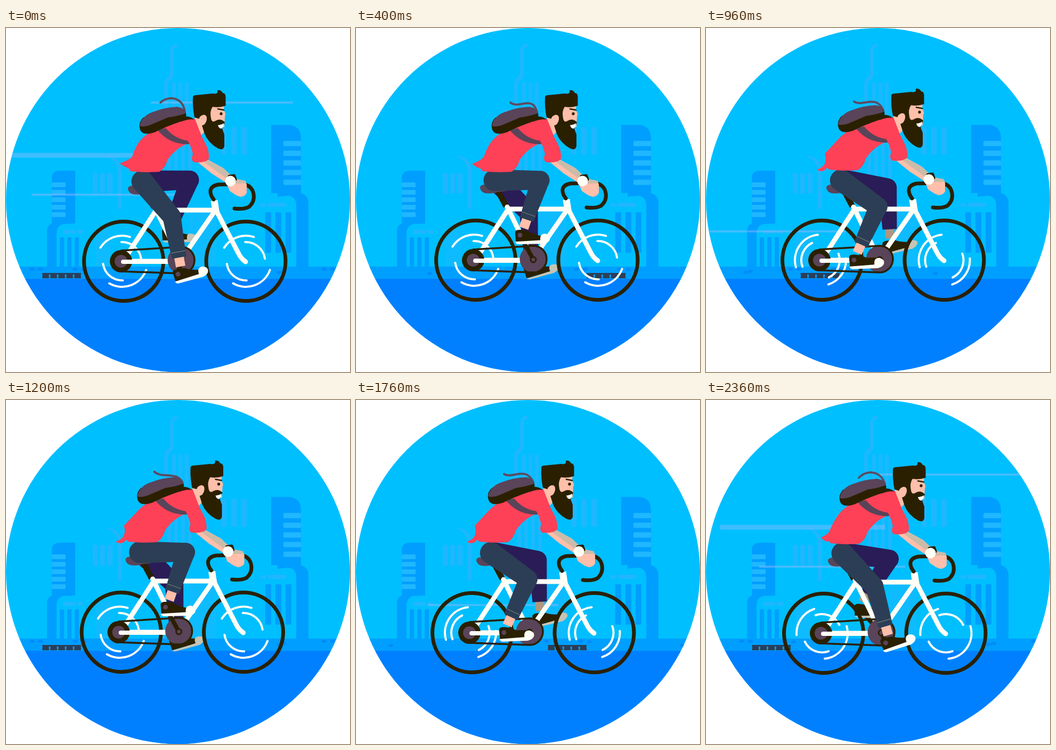
An HTML page that plays this animation: 646x646 px, repeating every 2400 ms.

```html
<!DOCTYPE html>
<html lang="en">
<head>
<meta charset="utf-8">
<title>Cyclist</title>
<style>
html, body { margin: 0; width: 100%; height: 100%; overflow: hidden; background: #fff; }
svg { display: block; width: 100vw; height: 100vh; }
.ink { fill: #2a2000; }
.inkLine { fill: none; stroke: #2a2000; stroke-linecap: round; stroke-linejoin: round; }
.plum { fill: #594459; }
.dark { fill: #009fff; }
.pale { fill: #1fb7ff; }
.skin { fill: #ffbfaa; }
.red { fill: #ff4157; }
.white { fill: none; stroke: #fffef6; stroke-linecap: round; stroke-linejoin: round; }
</style>
</head>
<body>
<svg viewBox="0 0 646 646">
  <defs><clipPath id="disc"><circle cx="323" cy="323" r="323"/></clipPath></defs>
  <g clip-path="url(#disc)">
    <rect width="646" height="646" fill="#00bfff"/>

    <g class="pale">
      <path d="M322 30Q308 30 308 46V84Q307 91 301 94Q297 98 297 108V165H304V108Q304 101 309 98Q315 95 315 84V42Q316 36 322 35Z"/>
      <path d="M187 240Q217 240 217 272V340H210V272Q209 247 187 240Z"/>
      <path d="M272 152Q300 152 300 180H292Q290 160 272 152Z"/>
      <path d="M107 379H130V386H107ZM135 379H145V386H135ZM478 329H488V336H478ZM492 328H526V336H492Z"/>
      <g id="stripes"></g>
      <path d="M168 378H196V448H168ZM345 345H395V448H345Z" opacity=".5"/>
    </g>

    <g class="dark">
      <path d="M86 280Q87 268 101 268H130V367H86Z"/>
      <path d="M77 448V382Q77 366 94 366H130V362H130V367Q120 368 108 368Q95 371 95 386V448Z"/>
      <path d="M498 182H532Q554 184 554 208V310H498Z"/>
      <path d="M510 310H553Q568 313 568 330V448H545V332Q544 315 528 315L510 317Z"/>
      <g id="bars"></g>
    </g>
    <g class="pale" id="panes"></g>

    <rect y="448" width="646" height="24" fill="#009fff"/>
    <rect y="471" width="646" height="175" fill="#0080ff"/>
    <g id="ground"></g>
    <g id="wind" fill="#9fb8ff"></g>

    <g id="rider">
      <g id="farLeg">
        <path id="farCrank" class="inkLine" stroke-width="8"/>
        <path id="farSkin" stroke="#ad9780" stroke-width="17"/>
        <g id="farShoe">
          <path class="ink" d="M-9-5Q-9-11 2-10L15-8Q25-1 40 2L53 5V12H-8Z"/>
          <path fill="#c6c4b4" d="M-9 13L38 11Q36-1 46 0Q57 2 56 8Q53 14 44 16H-3Z"/>
        </g>
        <g fill="#2a1c57"><path id="farThigh"/><path id="farShin"/></g>
      </g>

      <g class="inkLine" stroke-width="7">
        <circle cx="221" cy="438" r="74.5"/>
        <circle cx="450.5" cy="438" r="74.5"/>
      </g>
      <path id="spin" class="white" stroke-width="4"/>

      <path class="inkLine" stroke-width="11" style="stroke-linecap:butt" d="M261 305L278 337"/>
      <path class="plum" d="M229 303Q228 296 240 296H279Q290 298 288 304Q280 309 262 310Q250 314 238 312Q231 310 229 303Z"/>
      <g class="white" stroke-width="9">
        <path d="M391 342H282L220 438H318M280 338L328 436L392 344"/>
        <path d="M391 328L397 347L436 422Q441 433 450 439"/>
        <path stroke-width="13" style="stroke-linecap:butt" d="M391 324L394 344"/>
      </g>
      <circle class="ink" cx="216" cy="438" r="21"/>
      <circle class="plum" cx="216" cy="438" r="12"/>
      <path class="white" stroke-width="8" d="M220 439H308"/>
      <circle class="plum" cx="329" cy="436" r="25.5"/>
      <path class="inkLine" stroke-width="3.5" d="M216 418L329 411A25 25 0 0 1 329 461L216 457"/>
      <path id="nearCrank" class="inkLine" stroke-width="8"/>
      <circle cx="329" cy="437" r="5" fill="#594459" stroke="#2a2000" stroke-width="3"/>

      <path id="nearSkin" stroke="#ffbfaa" stroke-width="18"/>
      <g id="nearShoe">
        <path class="ink" d="M-9-5Q-9-11 2-10L15-8Q25-1 40 2L53 5V12H-8Z"/>
        <path fill="#fffef6" d="M-9 12L38 10Q37-3 48-2Q58 1 56 9Q54 15 44 17H-2Q-8 17-9 12Z"/>
        <circle class="plum" r="4.5"/>
      </g>
      <g fill="#2c3e55"><path id="nearThigh"/><path id="nearShin"/></g>
      <path id="cuff" stroke="#777f78" stroke-width="1.2"/>

      <path class="inkLine" stroke-width="7" d="M390 322Q383 313 384 305Q386 296 399 294L440 293Q459 293 464 308Q469 325 456 336Q447 341 429 339"/>

      <g id="body">
        <path class="skin" d="M355 168L378 166L377 185Q374 195 367 201L352 184Z"/>
        <path id="shirt" class="red"/>
        <path id="string" class="inkLine" stroke-width="4" style="stroke:#5d4a5f"/>
        <path class="plum" d="M284 191L300 188Q318 210 346 212L344 218Q308 220 284 191Z"/>
        <path class="ink" d="M336 166Q346 165 354 172Q343 170 329 176Z"/>
        <path class="ink" d="M251 187Q249 177 258 168L337 158Q342 168 330 175Q300 185 279 196Q253 204 251 187Z"/>
        <path class="plum" d="M253 177Q260 162 278 157Q298 149 321 148Q335 149 338 160Q325 165 304 168Q290 174 276 180Q261 187 251 184Z"/>

        <path class="skin" d="M359 251L371 243L408 263L430 284L448 288Q453 290 452 300V310Q448 317 440 317L432 314L420 306L414 291L386 273Z"/>
        <path fill="#cbbba8" d="M374 246L407 263L430 283L450 287L451 292L426 292L408 278L371 251Z"/>
        <path class="red" d="M341 190Q356 183 366 201L375 218Q382 231 381 246Q374 254 353 252Q346 248 351 237Q347 220 341 211Z"/>
        <path class="inkLine" stroke-width="7" d="M420 279L428 278L430 284"/>
        <circle cx="421.5" cy="287.5" r="10" fill="#fffef6"/>

        <path class="skin" d="M372 146L410 139L409 155Q414 161 411 166L410 186H380Z"/>
        <path class="ink" d="M351 130Q351 126 358 126L388 123Q399 125 397 117Q404 116 407 122Q412 122 412.500 129V146Q401 150 388 148Q382 156 385 170Q387 179 394 174Q403 169 411 177L406 189L410 200V222Q408 231 398 226Q380 216 373 199L368 183L376 165L371 164Q366 166 364 171L354 168Q350 149 351 130Z"/>
        <path class="skin" d="M362 177Q361 165 371 163Q378 163 377 172Q375 182 368 183Z"/>
        <path fill="#fff" d="M398 182Q403 183 409 179Q409 187 404 189Q399 188 398 182Z"/>
        <circle class="ink" cx="404" cy="161" r="2.7"/>
        <path class="inkLine" stroke-width="2.6" d="M398 152L409 154"/>
      </g>
    </g>
  </g>
</svg>
<script>
const $ = id => document.getElementById(id);
const set = (id, name, value) => $(id).setAttribute(name, value);
const rad = a => a * Math.PI / 180;
const pt = p => p[0].toFixed(2) + ' ' + p[1].toFixed(2);
const LOOP = 2400, TURN = 800, STEP = 40;
const rect = (x, y, w, h, r) => `<rect x="${x}" y="${y}" width="${w}" height="${h}" rx="${r}"/>`;

// f gives x, y, width, height
const repeat = (n, f) => Array.from({ length: n }, (_, i) => rect(...f(i), 2)).join('');
$('stripes').innerHTML =
  repeat(3, i => [312 + i * 12, 102, 7, 60]) + repeat(4, i => [303 + i * 13, 180, 7, 115]) +
  repeat(3, i => [404 + i * 19, 186, 10, 52]) + repeat(3, i => [163 + i * 14, 272, 9, 39]);
$('bars').innerHTML =
  repeat(3, i => [101 + i * 14, 393, 8, 56]) + repeat(3, i => [487 + i * 19, 346, 11, 76]);
$('panes').innerHTML =
  repeat(5, i => [86, 290 + i * 14, 26, 9]) + repeat(5, i => [521, 212 + i * 18.2, 33, 10]);

// smooth periodic curve through keys
function key(times, vals, period, t) {
  const n = times.length;
  const T = i => times[(i + n) % n] + Math.floor(i / n) * period;
  const V = i => vals[(i + n) % n];
  let i = n - 1;
  while (times[i] > t) i--;
  const h = T(i + 1) - T(i), u = (t - T(i)) / h;
  const m = k => {
    const a = V(k) - V(k - 1), b = V(k + 1) - V(k);
    if (a * b <= 0) return 0;
    return 2 / ((T(k) - T(k - 1)) / a + (T(k + 1) - T(k)) / b);
  };
  const u2 = u * u, u3 = u2 * u;
  return V(i) * (2 * u3 - 3 * u2 + 1) + V(i + 1) * (3 * u2 - 2 * u3) +
    h * (m(i) * (u3 - 2 * u2 + u) + m(i + 1) * (u3 - u2));
}
const SWAY = [0, 400, 960, 1400, 1760, 2120, 2360];
const sway = (t, ...vals) => key(SWAY, vals, LOOP, t);

function pedalAngle(t) {
  const p = t % TURN;
  return 79 + .45 * p + key([0, 160, 400, 520, 600, 760], [0, 10.6, -8, -10, -1.5, -6.4], TURN, p);
}
const footTilt = t => -8 + 11 * Math.cos(2 * Math.PI * (t - 290) / TURN);

// tapered limb, round or flat at the far end
function limb(p, q, r1, r2, round) {
  const dx = q[0] - p[0], dy = q[1] - p[1], len = Math.hypot(dx, dy);
  const n = [-dy / len, dx / len];
  const at = (c, r) => pt([c[0] + n[0] * r, c[1] + n[1] * r]);
  const end = round ? `A${r2} ${r2} 0 0 0 ` : 'L';
  return `M${at(p, r1)}L${at(q, r2)}${end}${at(q, -r2)}L${at(p, -r1)}A${r1} ${r1} 0 0 0 ${at(p, r1)}Z`;
}
const mix = (p, q, k) => [p[0] + (q[0] - p[0]) * k, p[1] + (q[1] - p[1]) * k];

function leg(side, hip, pedal, tilt) {
  const c = Math.cos(rad(tilt)), s = Math.sin(rad(tilt));
  const ankle = [pedal[0] + 9 * c + 18 * s, pedal[1] + 9 * s - 18 * c];
  const thigh = 86, shin = 90;
  const vx = ankle[0] - hip[0], vy = ankle[1] - hip[1];
  const d = Math.min(Math.hypot(vx, vy), 175.5);
  const a = (thigh * thigh - shin * shin + d * d) / (2 * d);
  const h = Math.sqrt(Math.max(0, thigh * thigh - a * a));
  const ux = vx / d, uy = vy / d;
  const knee = [hip[0] + ux * a + uy * h, hip[1] + uy * a - ux * h];
  const hem = mix(knee, ankle, .87);
  set(side + 'Thigh', 'd', limb(hip, knee, 20.5, 17.5, true));
  set(side + 'Shin', 'd', limb(knee, hem, 17.3, 13.5, false));
  set(side + 'Skin', 'd', `M${pt(mix(knee, ankle, .8))}L${pt(mix(knee, ankle, 1.06))}`);
  set(side + 'Shoe', 'transform', `translate(${pt(pedal)}) rotate(${tilt.toFixed(2)})`);
  set(side + 'Crank', 'd', `M329 437L${pt(pedal)}`);
  if (side === 'near') {
    const m = mix(knee, ankle, .75), nx = -(ankle[1] - knee[1]) / shin * 13.5, ny = (ankle[0] - knee[0]) / shin * 13.5;
    set('cuff', 'd', `M${pt([m[0] + nx, m[1] + ny])}L${pt([m[0] - nx, m[1] - ny])}`);
  }
}

function arc(cx, cy, r, mid, half) {
  const at = a => pt([cx + r * Math.cos(rad(a)), cy + r * Math.sin(rad(a))]);
  return `M${at(mid - half)}A${r} ${r} 0 0 1 ${at(mid + half)}`;
}

// speed lines: left edge at moment, moment, y, length, thickness, px per ms, opacity
const GUSTS = [
  [272, 0, 140, 267, 4, 1.32, .42],
  [26, 2360, 239, 310, 9, 2.05, .4],
  [48, 0, 313, 275, 4, 1.29, .42],
  [5, 960, 382, 257, 4, 1.31, .4],
  [135, 1760, 385, 245, 4, 1.31, .4],
  [498, 1400, 496, 250, 10, 2.05, .18],
  [320, 640, 568, 280, 9, 2.05, .18]
];
const SPOTS = [[65, 453], [130, 453], [146, 454], [321, 461], [513, 459], [522, 457], [597, 453]];
const GAP = 548;

function ground(t) {
  const shift = t * 2 * GAP / LOOP;
  const wrap = x => ((x - shift + 100) % GAP + GAP) % GAP - 100;
  let out = '';
  for (const [x, y] of SPOTS)
    for (const k of [0, GAP])
      out += `<ellipse cx="${wrap(x) + k}" cy="${y}" rx="5" ry="3" fill="#008cfa"/>`;
  for (const k of [0, GAP]) {
    const x = wrap(68) + k;
    out += `<g transform="translate(${x} 460)" fill="#2c3e55">${rect(0, 0, 73, 3, 1)}`;
    for (let i = 0; i < 5; i++) out += `<path d="M${i * 15 + 1} 0h11l1 10h-13Z"/>`;
    out += '</g>';
  }
  $('ground').innerHTML = out;
}

function wind(t) {
  $('wind').innerHTML = GUSTS.map(([x0, t0, y, len, h, v, o]) => {
    const dt = ((t - t0 + LOOP * 1.5) % LOOP) - LOOP / 2;
    const x = x0 - v * dt;
    if (x > 660 || x + len < -10) return '';
    return `<g opacity="${o}">${rect(x, y - h / 2, len, h, 1)}</g>`;
  }).join('');
}

function draw(t) {
  const dx = sway(t, 0, 4, -3, -5, -3, -1.5, 0);
  const bike = sway(t, 0, -2, -2, -2, -1, 0, 0);
  const lift = sway(t, 0, 0, -3, -3, -3, -2, 0) - bike;
  set('rider', 'transform', `translate(${dx.toFixed(2)} ${bike.toFixed(2)})`);
  set('body', 'transform', `translate(0 ${lift.toFixed(2)})`);

  const a = rad(pedalAngle(t)), px = 37 * Math.cos(a), py = 37 * Math.sin(a);
  leg('near', [256, 288], [316 + px, 426 + py], footTilt(t));
  leg('far', [259, 288], [309 - px, 423 - py], footTilt(t + TURN / 2));

  let spin = '';
  for (const cx of [218, 450.5])
    for (const half of [0, 180])
      spin += arc(cx, 438, 48, 70 + .9 * t + half, half ? 38 : 50) + arc(cx, 438, 36, 130 + .45 * t + half, 42);
  set('spin', 'd', spin);

  const ty = sway(t, 254, 255, 269, 269, 269, 267, 258);
  const tx = sway(t, 214, 214, 211, 209, 211, 210, 216);
  const droop = (ty - 254) / 15;
  set('shirt', 'd', `M355 171Q330 166 302 181Q270 193 254 209Q243 221 ${237 - 11 * droop} ${242 - 3 * droop}` +
    `Q${231 + 2 * droop} ${ty - 6} ${tx} ${ty}` +
    `Q221 ${ty + 6} 227 ${Math.min(ty + 8, 269)}Q231 263 234 269Q262 272 288 270Q300 262 303 248Q319 225 343 216L367 202Z`);

  const sx = sway(t, 290, 286, 281, 284, 281, 288, 287), sy = sway(t, 140, 140, 141, 135, 142, 144, 146);
  const c1 = sway(t, 126, 153, 152, 151, 152, 123, 130), c2 = sway(t, 129, 125, 126, 143, 126, 127, 133);
  set('string', 'd', `M${sx} ${sy}C${sx + 15} ${c1} ${sx + 42} ${c2} 336 158`);

  ground(t);
  wind(t);
}

const start = performance.now();
function tick() {
  const t = (performance.now() - start) % LOOP;
  draw(Math.floor(t / STEP) * STEP);
  requestAnimationFrame(tick);
}
tick();
</script>
</body>
</html>
```
